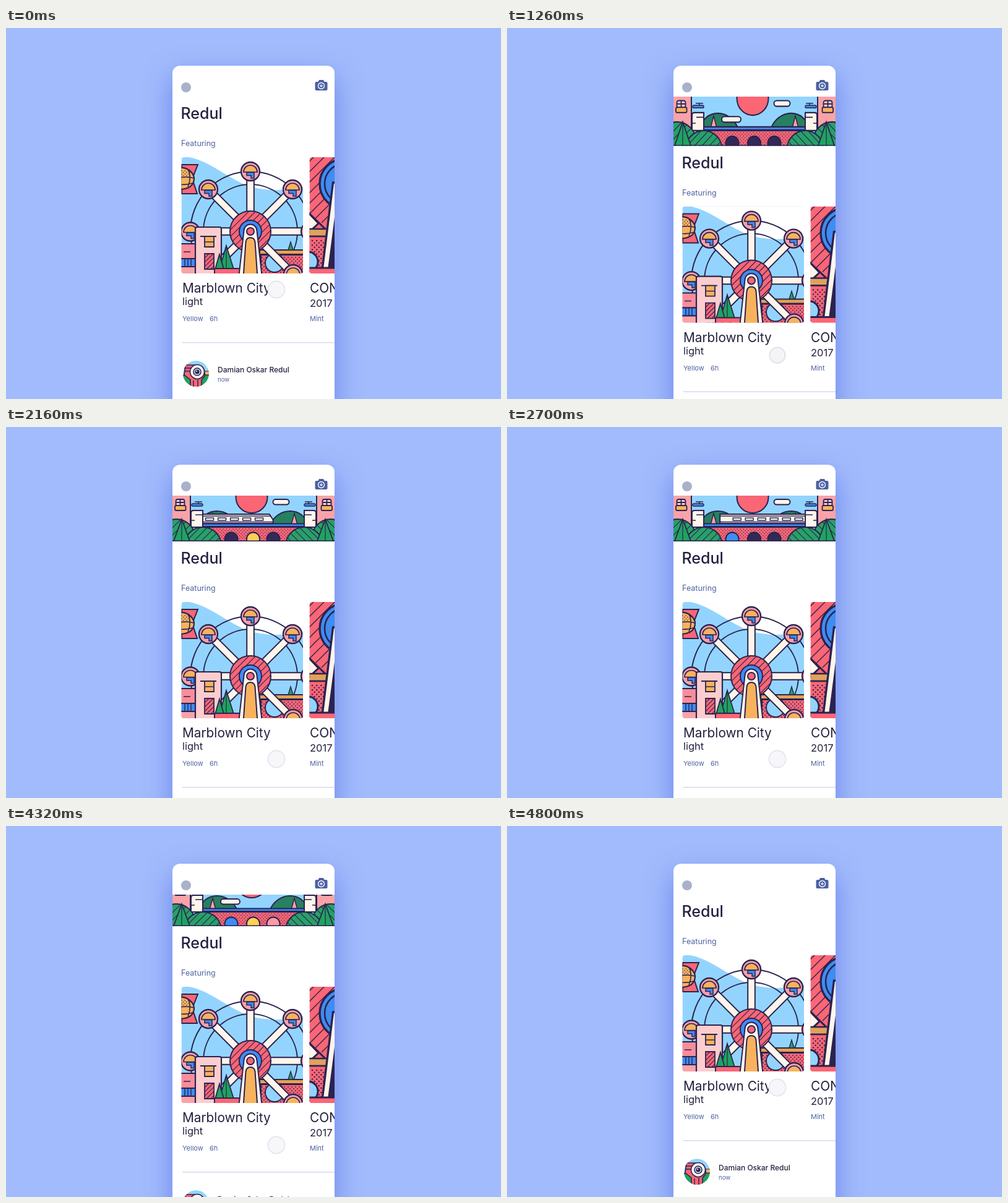
Animation of 800 by 600 pixels, one loop 5400 ms. Source, as an HTML page with a canvas:

```html
<!DOCTYPE html>
<html lang="en">
<head>
<meta charset="utf-8">
<title>Pull to refresh</title>
<style>
html, body { margin: 0; width: 100%; height: 100%; overflow: hidden; background: #a2bbfc; }
canvas { display: block; }
</style>
</head>
<body>
<canvas id="stage" width="800" height="600"></canvas>
<script>
const ctx = document.getElementById('stage').getContext('2d');
const LOOP = 5400, OPEN = 74, TOP = 111;
const NAVY = '#2b2350', RED = '#fb6675', SKY = '#93d4ff', BLUE = '#3f8cf2', PINK = '#fccdce',
  ROSE = '#f9a3a8', CORAL = '#f98d9a', ORANGE = '#f8b25e', CREAM = '#fff5ea', GREEN = '#1fa360',
  PINE = '#278060', BUSH = '#28a068', INK = '#25213f', MUTED = '#5063a2', UNLIT = '#332957';

// timing helpers
const clamp = v => Math.max(0, Math.min(1, v));
const ramp = (t, a, b) => clamp((t - a) / (b - a));
const mix = (a, b, k) => a + (b - a) * k;
function ease(x) { // cubic-bezier(.33, 0, .3, 1)
  let lo = 0, hi = 1, s = 0.5;
  for (let i = 0; i < 20; i++) {
    s = (lo + hi) / 2;
    const q = 1 - s;
    if (0.99 * q * q * s + 0.9 * q * s * s + s * s * s < x) lo = s; else hi = s;
  }
  return s * s * (3 - 2 * s);
}
const smooth = x => x * x * (3 - 2 * x);

// drawing helpers
function circ(x, y, r) { const p = new Path2D(); p.arc(x, y, r, 0, 7); return p; }
function box(x, y, w, h, r = 0) { const p = new Path2D(); p.roundRect(x, y, w, h, r); return p; }
const path = d => new Path2D(d);
function draw(p, fill, width = 0, color = NAVY) {
  if (fill) { ctx.fillStyle = fill; ctx.fill(p); }
  if (width) { ctx.lineWidth = width; ctx.strokeStyle = color; ctx.stroke(p); }
}
const line = (d, width = 2, color = NAVY) => draw(path(d), null, width, color);
function scoped(fn, clip) {
  ctx.save();
  if (clip) ctx.clip(clip);
  fn();
  ctx.restore();
}
function hatch(p, x, y, size, step, width = 1.2, color = NAVY) {
  scoped(() => {
    const lines = new Path2D();
    for (let k = 0; k < size * 2; k += step) {
      lines.moveTo(x + k, y);
      lines.lineTo(x + k - size, y + size);
    }
    draw(lines, null, width, color);
  }, p);
}
function dots(p, x, y, w, h, step, r) {
  scoped(() => {
    ctx.fillStyle = NAVY;
    for (let j = 0; j * step < h; j++)
      for (let i = 0; i * step * 2 < w + step; i++) {
        ctx.beginPath();
        ctx.arc(x + i * step * 2 + (j % 2) * step, y + j * step, r, 0, 7);
        ctx.fill();
      }
  }, p);
}
function text(s, x, y, size, color = INK, weight = 400) {
  ctx.font = `${weight} ${size}px Inter, "Open Sans", sans-serif`;
  ctx.fillStyle = color;
  ctx.fillText(s, x, y);
}

function header() {
  draw(circ(291, 96, 8), '#a9b1cb');
  draw(box(499.5, 87, 20, 14, 2), '#4c60a2');
  draw(path('M504 88 L506 84 H513 L515 88Z'), '#4c60a2');
  draw(circ(509.5, 93.5, 5), null, 1.3, '#fff');
  draw(circ(509.5, 93.5, 2), '#fff');
  draw(circ(509.5, 93.5, 0.8), '#4c60a2');
}

function cabin(x, y) {
  scoped(() => {
    ctx.translate(x, y);
    draw(circ(0, 0, 15), '#f7a0ac', 2.3);
    draw(path('M-11 1 A11 11 0 0 1 11 1Z'), ORANGE, 1.7);
    draw(path('M-6 1.5 H6 V11 H1 V6.5 H-6Z'), BLUE, 1.5);
  });
}

function blimp() {
  draw(path('M284 221 H310 L301 244 L309 268 H284Z'), RED, 2);
  const hull = path('M276 226 Q288 224 296 230 Q304 236 304 244 Q303 262 276 261Z');
  draw(hull, ORANGE, 2.2);
  dots(hull, 284, 231, 12, 12, 2.6, 0.8);
  line('M276 243 Q292 239 304 243 M276 253 Q292 254 301 251 M295 230 Q300 243 294 257', 1.6);
}

function wheelCard() {
  const frame = box(283.5, 209, 196.5, 188, 4);
  scoped(() => {
    draw(frame, SKY);
    draw(path('M296 209 C328 215 355 240 388 254 C414 264 450 264 480 257 V209Z'), '#fff');
    blimp();
    draw(circ(395, 329, 97), null, 2);
    draw(circ(395, 329, 76), null, 2);

    // shore on the right
    draw(box(412, 367, 80, 40), RED, 2);
    dots(box(412, 368, 80, 30), 414, 371, 70, 30, 3, 0.95);
    draw(circ(434, 380, 15), SKY, 2);
    draw(box(410, 359, 80, 7), '#e8a052', 2);
    draw(path('M460 346 L464 359 H456Z'), GREEN, 1.4);

    for (let i = 0; i < 8; i++) {
      if (i === 4) continue;
      scoped(() => {
        ctx.translate(395, 329);
        ctx.rotate(i * Math.PI / 4);
        draw(box(-5.8, -92, 11.6, 70), CREAM, 2);
      });
    }
    [[395, 232], [327, 261], [463, 261], [298, 329.5], [492, 329], [464, 398]].forEach(c => cabin(...c));
    const hub = circ(395, 329, 33);
    draw(hub, RED);
    hatch(hub, 361, 295, 70, 11, 1.2);
    draw(hub, null, 2);
    draw(circ(395, 329, 18), BLUE, 2);

    // low buildings
    draw(box(276, 349, 30, 24), CORAL, 2);
    line('M287 362 H298', 1.6);
    draw(box(276, 373, 30, 13), BLUE, 2);
    line('M289 373 V386 M294 373 V386 M299 373 V386', 1.4);
    draw(box(276, 386, 30, 14), ROSE, 2);
    draw(path('M306 402 V325 Q306 322 309 322 H345 Q348 322 348 325 V402Z'), PINK, 2.2);
    line('M314 337 H340', 1.8);
    draw(box(321, 337, 15, 17), ORANGE, 1.8);
    line('M321 346 H336', 1.6);
    const pane = box(321, 365, 15, 25);
    draw(pane, RED, 1.8);
    hatch(pane, 321, 365, 28, 7, 1.2);

    draw(path('M356 352 L368 390 H345Z'), GREEN, 1.8);
    draw(path('M345 366 L352 390 H338Z'), GREEN, 1.8);
    line('M356 352 V388', 1.2);
    draw(box(337, 389, 73, 16, 2), RED, 2);
    draw(path('M376 404 L384.5 328 A10.5 10.5 0 0 1 405.5 328 L414 404Z'), CREAM, 2);
    draw(path('M383.5 404 L387.5 346 Q388.5 339 395 339 Q401.5 339 402.5 346 L406.5 404Z'), ORANGE, 2);
    draw(circ(395, 329, 6), RED, 2);
  }, frame);
}

function sideCard() {
  const frame = box(490.5, 209, 60, 188, 4);
  scoped(() => {
    draw(frame, RED);
    hatch(frame, 484, 205, 110, 17, 1.4);
    draw(circ(548, 252, 41), BLUE, 3.4);
    draw(circ(548, 252, 33), BLUE, 2.6);
    draw(path('M488 298 L505 316 L488 332Z'), CREAM, 3);
    line('M488 298 L516 325', 3);
    draw(box(486, 325, 50, 12), '#e0a25c', 2.5);
    draw(box(486, 337, 50, 56), RED, 2.5);
    dots(box(486, 339, 50, 50), 495, 344, 40, 46, 3.6, 1.2);
    draw(circ(488, 378, 16), SKY, 3);
    draw(path('M520 392 L531 290 H550 V392Z'), NAVY);
    draw(path('M511 392 L528.5 250 H540 L521.5 392Z'), CREAM, 3.4);
    draw(box(486, 388, 60, 14), RED, 3);
  }, frame);
}

function avatar() {
  const disc = circ(307, 559, 21);
  scoped(() => {
    draw(disc, SKY);
    draw(box(284, 562, 24, 24), GREEN, 1.5);
    draw(box(308, 561, 24, 24), GREEN, 1.5);
    draw(box(314, 555, 18, 6), ORANGE, 1.2);
    draw(path('M290 545 H311 Q323 549 321 563 L316 569 V584 H298 V569 L288 561Z'), RED, 1.6);
    line('M288 550 H300 M288 555 H298 M303 570 V582 M310 569 V582', 1.5);
    draw(circ(309, 556, 11.5), CREAM, 1.6);
    draw(circ(309, 556, 6), '#c9dcf7', 1.6);
    draw(circ(309, 556, 3.6), NAVY);
    draw(circ(308, 555, 1.1), '#fff');
  }, disc);
}

function page() {
  text('Redul', 282.5, 147, 25, INK, 500);
  text('Featuring', 283, 191, 12.5, MUTED);
  wheelCard();
  sideCard();
  text('Marblown City', 285, 428, 20.8);
  text('light', 285, 448, 16.5);
  text('Yellow', 285, 474, 11, MUTED);
  text('6h', 329, 474, 11, MUTED);
  text('CON', 491, 428, 20.8);
  text('2017', 491, 451, 16.5);
  text('Mint', 491, 474, 11, MUTED);
  draw(box(285, 508, 246, 1.5), '#d6daed');
  avatar();
  text('Damian Oskar Redul', 342, 557, 12, INK, 500);
  text('now', 342, 572, 9.7, MUTED);
}

function train(t) {
  const tail = 344 + 0.19 * (t - 2700), length = 190;
  scoped(() => {
    draw(path(`M${tail} 156 V141 H${tail + length - 6} L${tail + length} 150 V156Z`), CREAM, 2);
    line(`M${tail} 144 H${tail + length - 4}`, 1.6);
    line(`M${tail} 153.5 H${tail + length}`, 1.4);
    for (let x = tail + 21; x < tail + length - 14; x += 20)
      draw(box(x, 147, 13, 4), '#fff', 1.4);
  }, box(318, 136, 165, 22));
}

// scenery on one bank; the other bank is its mirror
function hills() {
  draw(path('M312 160 C318 128 362 128 374 160Z'), PINE, 2);
  draw(path('M334 140 L339 158 H329Z'), ROSE, 1.5);
}
function bank() {
  draw(path('M299 162 V139 Q299 135 303 135 H318 V162Z'), CREAM, 2);
  line('M306 142 H317 M299 151 H305', 1.6);
  draw(box(262, 100, 36, 90), ROSE, 2);
  draw(box(274.5, 117, 14, 11, 3), PINK, 1.8);
  line('M281.5 117 V128 M274 122 H289', 1.8);
  draw(box(273, 127, 17.5, 8, 2), ORANGE, 1.8);
  line('M305 121 H317 M311 121 V128', 1.6);
  draw(box(300, 124, 18, 4, 2), BLUE, 1.4);
  [[275, 180, 31], [318, 192, 30]].forEach(([x, y, r]) => {
    const bush = circ(x, y, r);
    draw(bush, BUSH);
    hatch(bush, x - r, 140, 70, 12, 1.1);
    draw(bush, null, 2);
  });
  draw(path('M284 149 L299 190 H269Z'), GREEN, 1.8);
  line('M284 152 V186', 1.2);
}
function bothSides(fn) {
  fn();
  scoped(() => { ctx.translate(800, 0); ctx.scale(-1, 1); fn(); });
}

// how brightly each arch is lit: a three-step chase, then all together
function glow(i, t) {
  if (t >= 4140) return ramp(t, 4170, 4320);
  let level = 0;
  for (let n = 0; n < 2; n++) {
    const on = 1380 + 1170 * n + 390 * i;
    level += ramp(t, on, on + 150) - ramp(t, on + 390, on + 540);
  }
  return clamp(level);
}

function hero(t, off) {
  if (off < 0.05) return;
  scoped(() => {
    if (off > OPEN) {
      ctx.translate(0, TOP);
      ctx.scale(1, off / OPEN);
      ctx.translate(0, -TOP);
    } else ctx.translate(0, off - OPEN);

    draw(box(269, 100, 262, 90), SKY);
    draw(circ(397, 113.5, 25.5), RED, 2);
    draw(box(431.5, 117, 26, 8.5, 4.2), CREAM, 2);
    bothSides(hills);
    draw(box(347, 141, 31, 8.5, 4.2), CREAM, 2);
    if (t > 1500 && t < 3600) train(t);

    const wall = box(310, 162, 180, 24);
    draw(wall, RED, 2);
    dots(wall, 320, 165, 164, 22, 2.6, 0.75);
    draw(box(312, 156.5, 176, 4.5), BLUE, 2);
    [[364, BLUE], [399.5, '#ffd154'], [432, '#fd9aa6']].forEach(([x, color], i) => {
      const arch = circ(x, 181, 10.5);
      draw(arch, UNLIT, 1.8);
      ctx.globalAlpha = glow(i, t);
      draw(arch, color);
      ctx.globalAlpha = 1;
      draw(arch, null, 1.8);
    });
    bothSides(bank);
    draw(box(269, 183.5, 262, 1.5), NAVY);
  }, box(269, TOP, 262, off));
}

function scrollOffset(t) {
  if (t < 1290) return 80 * ease(ramp(t, 960, 1290));
  if (t < 4140) return mix(80, OPEN, smooth(ramp(t, 1290, 1590)));
  return OPEN * (1 - ease(ramp(t, 4140, 4800)));
}

function cursor(t) {
  const pull = t < 4140 ? ease(ramp(t, 960, 1380)) : 1 - smooth(ramp(t, 4140, 4800));
  const press = ramp(t, 690, 810) - ramp(t, 1400, 1540);
  const dot = circ(437, 423 + 114 * pull, mix(13.6, 12.6, press));
  const gray = mix(247, 244, press);
  draw(dot, `rgb(${gray},${gray},${gray + 2})`, 1.6, press > 0.5 ? '#dcdde9' : '#e1e4f2');
}

function render(now) {
  const t = now % LOOP, off = scrollOffset(t);
  draw(box(0, 0, 800, 600), '#a2bbfc');
  const phone = box(269, 61, 262, 580, [12, 12, 0, 0]);
  scoped(() => {
    ctx.shadowColor = 'rgba(70,100,225,.62)';
    ctx.shadowBlur = 44;
    ctx.shadowOffsetY = 18;
    draw(phone, '#fff');
  });
  scoped(() => {
    header();
    scoped(() => { ctx.translate(0, off); page(); });
    hero(t, off);
    cursor(t);
  }, phone);
}

const start = performance.now();
function tick() {
  render(performance.now() - start);
  requestAnimationFrame(tick);
}
tick();
</script>
</body>
</html>
```
